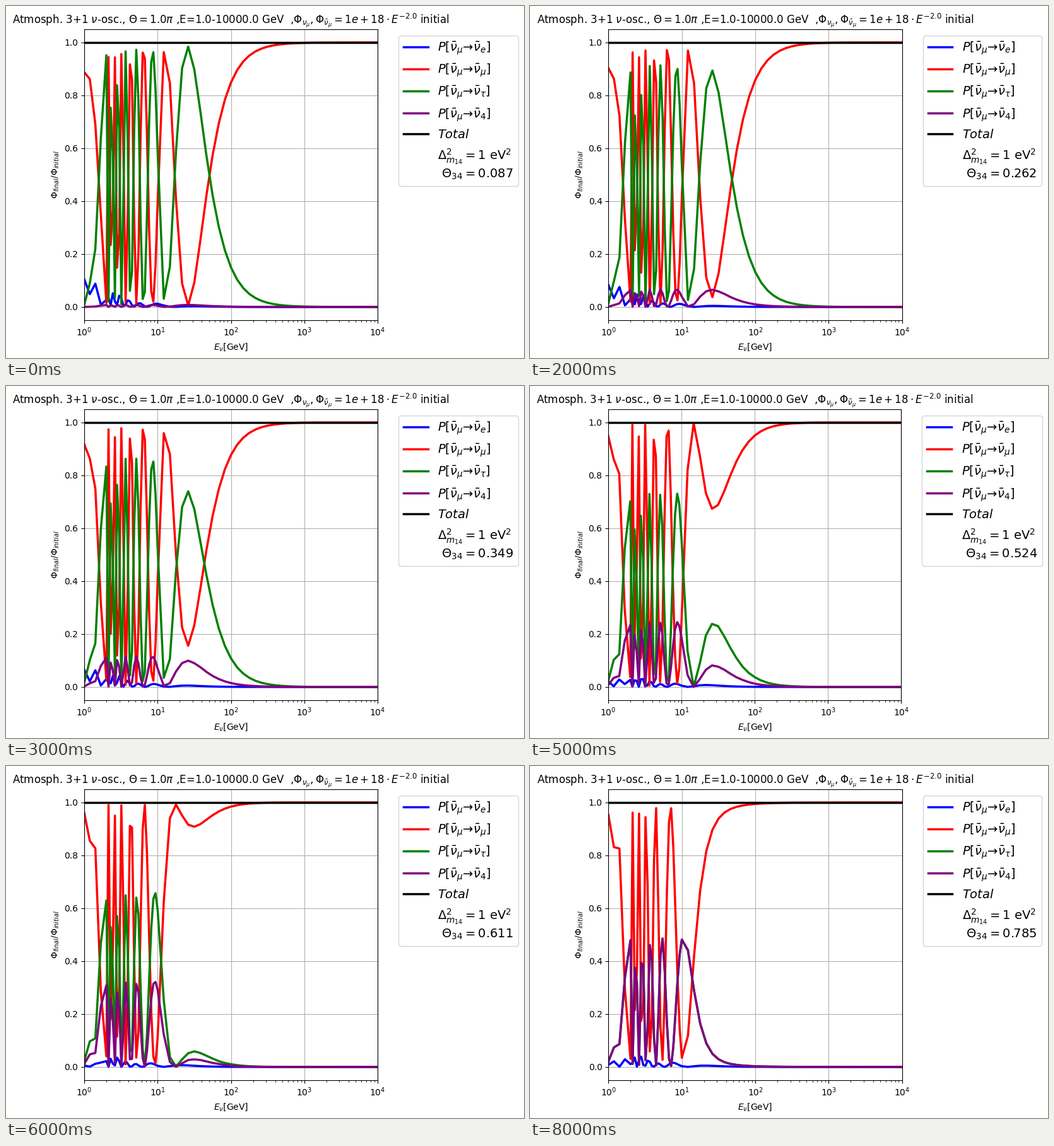
Write a matplotlib script that moves like this. It is 821 by 559 pixels and loops after 9 s.

```python
import numpy as np
import matplotlib.pyplot as plt
from matplotlib.animation import FuncAnimation

W, H, DPI = 821, 559, 100
R = 6371.0               # Earth radius, km
KM = 5.0677e9            # km in 1/eV
V0 = 7.63e-14            # sqrt(2) G_F per g/cm3, in eV

# Mixing angles and mass splittings (eV^2)
T12, T13, T23 = 0.584, 0.148, 0.7373
DM = np.array([0, 7.5e-5, 2.585e-3, 1.0])
T34 = np.radians(5) * np.arange(1, 10)


def rotation(i, j, angle):
    m = np.eye(4)
    m[i, i] = m[j, j] = np.cos(angle)
    m[i, j] = np.sin(angle)
    m[j, i] = -m[i, j]
    return m


def matter(x):
    """Density and electron fraction at radius x (Earth radius = 1)."""
    if x < 0.546:
        return 12.9 - 10.3 * x * x, 0.4656
    return (7.4 - 3.4 * x if x < 0.895 else 3.6), 0.4957


def earth_path(steps=200):
    """Steps (length, density, electron fraction): air, then the diameter."""
    yield 22.0, 0.0, 0.5
    for i in range(steps):
        yield (2 * R / steps, *matter(abs((2 * i + 1) / steps - 1)))


def oscillate(energy):
    """Flavour probabilities [angle, energy, flavour] for an initial anti-nu_mu."""
    light = rotation(1, 2, T23) @ rotation(0, 2, T13) @ rotation(0, 1, T12)
    mix = np.array([rotation(2, 3, t) @ light for t in T34])
    mass = (mix * DM) @ mix.transpose(0, 2, 1)
    vacuum = mass[:, None] / (2e9 * energy[:, None, None])
    psi = np.zeros(vacuum.shape[:3] + (1,), complex)
    psi[:, :, 1] = 1
    for length, rho, ye in earth_path():
        cc, nc = V0 * rho * ye, V0 * rho * (1 - ye) / 2
        w, v = np.linalg.eigh(vacuum - np.diag([cc - nc, -nc, -nc, 0]))
        phase = np.exp(-1j * w * length * KM)[..., None]
        psi = v @ (phase * (v.swapaxes(-1, -2) @ psi))
    return np.abs(psi[..., 0]) ** 2


# The grid is finer between 2 and 10 GeV
energy = np.concatenate([
    np.geomspace(1, 2, 5)[:-1],
    np.geomspace(2, 10, 25)[:-1],
    np.geomspace(10, 1e4, 37),
])
prob = oscillate(energy)

fig = plt.figure(figsize=(W / DPI, H / DPI), dpi=DPI)
ax = fig.add_axes([0.1, 0.1, 0.5, 0.5])
ax.set(xscale="log", xlim=(1, 1e4), ylim=(-0.05, 1.05))
ax.grid(True)
ax.set_xlabel(r"$E_{\nu}$[GeV]")
ax.set_ylabel(r"$\Phi_{final}/\Phi_{initial}$")
ax.set_title(r"Atmosph. 3+1 $\nu$-osc., $\Theta=1.0\pi$ ,E=1.0-10000.0 GeV  ,"
             r"$\Phi_{\nu_\mu},\Phi_{\bar{\nu}_\mu}=1e+18\cdot E^{-2.0}$ initial")

lines = [
    ax.plot(energy, energy * 0, color=color, lw=2.5,
            label=r"$P[\bar{\nu}_\mu→\bar{\nu}_%s]$" % flavour)[0]
    for color, flavour in zip(["blue", "red", "green", "purple"],
                              ["e", r"\mu", r"\tau", "4"])
]
ax.plot(energy, energy * 0 + 1, color="black", lw=2.5, label="$Total$")
ax.plot([], [], " ", label="x")
legend = ax.legend(bbox_to_anchor=(1.05, 1), loc="upper left", fontsize=14)
note = legend.get_texts()[-1]


def legend_width(angle):
    note.set_text("$\\Delta^2_{m_{14}}=1$ eV$^2$\n $\\Theta_{34}=%.3f$" % angle)
    return legend.get_window_extent().width


base = legend_width(T34[0])


def update(i):
    # A wider legend widens the page, which is then fitted to the stage
    k = W / round(W + legend_width(T34[i]) - base)
    ax.set_position([124.1 * k / W, 60.1 / H, 465 * k / W, 462 / H])
    for line, p in zip(lines, prob[i].T):
        line.set_ydata(p)
    return lines


anim = FuncAnimation(fig, update, frames=9, interval=1000, repeat=True,
                     init_func=lambda: update(0))
plt.show()
```
